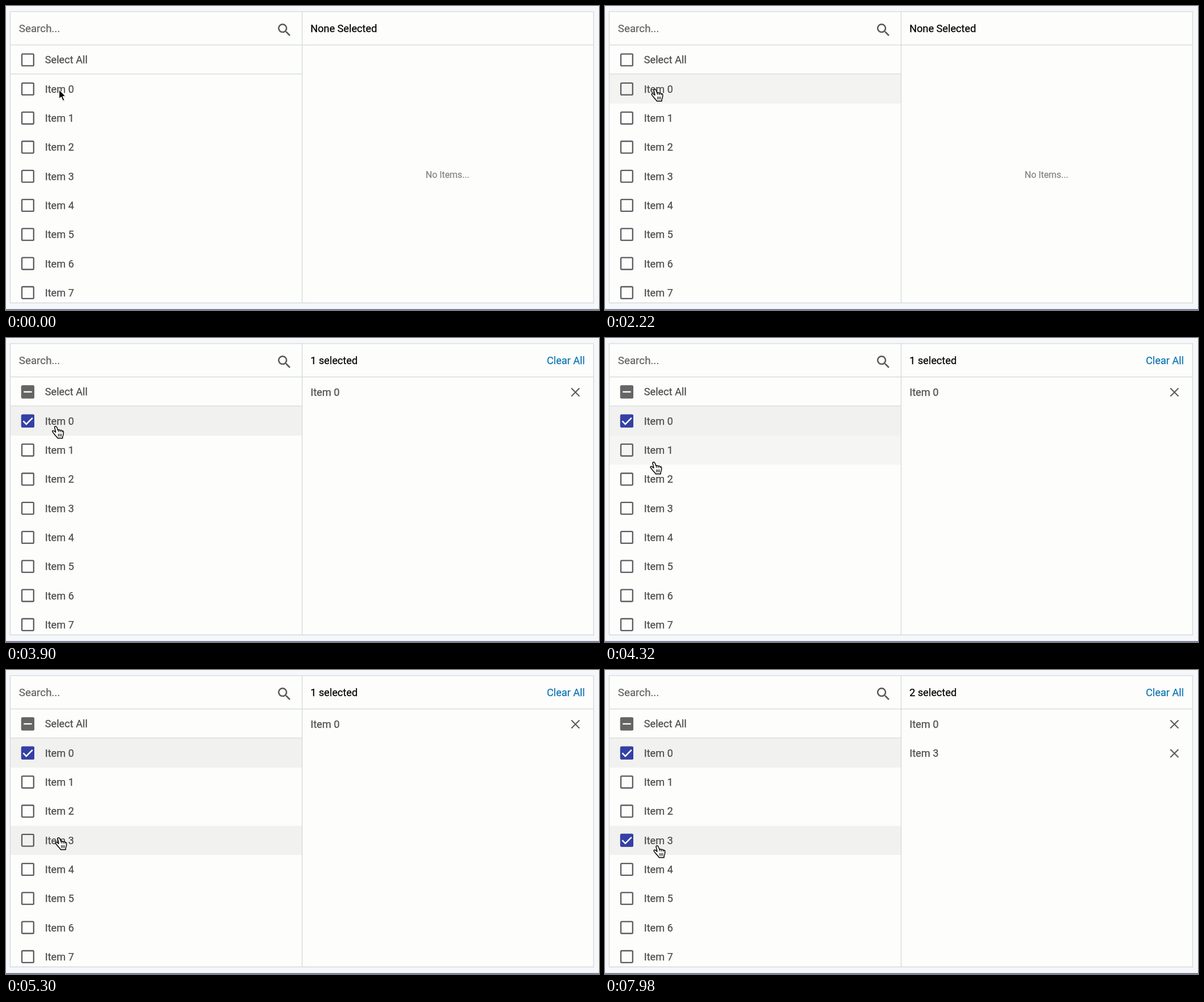
An HTML page that plays this animation: 1046x536 px, repeating every 8000 ms.

```html
<!DOCTYPE html>
<html lang="en">
<head>
<meta charset="utf-8">
<title>Multi-select list</title>
<style>
  html, body { margin: 0; width: 100%; height: 100%; overflow: hidden; background: #f6f7fa; }
  svg { display: block; }
  text { font: 18.2px Roboto, sans-serif; color: #4c4c4c; fill: currentColor; stroke: currentColor; stroke-width: .25; white-space: pre; }
  .search { font-size: 18.8px; color: #626262; }
  .head { color: #000; }
  .link { color: #0b75b3; }
  .empty { font-size: 15.9px; color: #858585; text-anchor: middle; }
  .line { fill: none; stroke: #d3d9da; stroke-width: 1.3; }
  .box { fill: none; stroke: #5c5c62; stroke-width: 2.3; }
  .tick { fill: none; stroke: #fff; stroke-width: 2.5; stroke-dasharray: 24; }
  .cross { stroke: #5c5c5c; stroke-width: 2.1; }
  .hover { fill: #f1f1f0; }
</style>
</head>
<body>
<svg id="stage" width="1046" height="536" viewBox="0 0 1046 536"></svg>
<script>
const LOOP = 8000, PITCH = 51.3, FADE = 380;
const POINT = 1900;                       // arrow becomes a hand
const clicks = [{ row: 0, at: 2600 }, { row: 3, at: 7500 }];
const hovers = [                          // row, enter, leave
  [0, POINT, Infinity], [1, 4080, 4480], [2, 4480, 4920], [3, 4920, Infinity]
];
const path = [                            // time, x, y of the pointer tip
  [1900, 89, 147], [3800, 89, 147], [4080, 88, 172], [4320, 87, 219],
  [4480, 88, 230], [4740, 89, 263], [4920, 92, 277], [5300, 94, 296], [5700, 93, 310]
];

const clamp = v => Math.max(0, Math.min(1, v));
const rowY = i => 146.3 + PITCH * i;
const text = (x, y, s, cls = '') => `<text x="${x}" y="${y}" class="${cls}">${s}</text>`;
const box = y => `<rect class="box" x="28" y="${y - 10.4}" width="20.8" height="20.8" rx="1.5"/>`;
const fill = (y, color) => `<rect x="26.85" y="${y - 11.55}" width="23.1" height="23.1" rx="2"fill="${color}"/>`;

const listRow = i => {
  const y = rowY(i);
  return `<rect class="hover" id="hover${i}" x="8" y="${y - 25.5}" width="514" height="${PITCH}" opacity="0"/>
    ${box(y)}
    <g id="check${i}" opacity="0">${fill(y, '#3440a6')}
      <path class="tick" id="tick${i}" d="M30.4 ${y}l5.4 5.6L46.8 ${y - 5.4}"/></g>
    ${text(68.7, y + 6.4, 'Item ' + i)}`;
};

const chosenRow = (row, i) => {
  const y = rowY(i - 1) + .4;
  return `<g id="chosen${i}">${text(537.2, y + 6.2, 'Item ' + row)}
    <path class="cross" d="M997.3 ${y - 6.8}l14.2 14.2m0-14.2l-14.2 14.2"/></g>`;
};

stage.innerHTML = `
  <rect x="7.5" y="9.7" width="1029" height="514" fill="#fdfdfc"/>
  ${[0, 1, 2, 3, 4, 5, 6, 7].map(listRow).join('')}
  <path class="line" d="M7.5 9.9H1036.5V523.5H7.5ZM522.4 10V523.5M8 68.6H1036M8 119.9H522"/>
  <path d="M0 535.2H1046" stroke="#62678f" stroke-width="1.6"/>
  ${text(22.8, 46.3, 'Search...', 'search')}
  <path transform="translate(475.9 27.2) scale(1.26)" fill="#585858" d="M15.5 14h-.79l-.28-.27A6.47 6.47 0 0 0 16 9.5 6.5 6.5 0 1 0 9.5 16c1.61 0 3.09-.59 4.23-1.57l.27.28v.79l5 4.99L20.49 19l-4.99-5zm-6 0a4.5 4.5 0 1 1 0-9 4.5 4.5 0 0 1 0 9z"/>
  ${box(95)}
  <g id="partial" opacity="0">${fill(95, '#656565')}
    <path d="M31.2 95H45.6" stroke="#fff" stroke-width="2.4"/></g>
  ${text(68.7, 101.4, 'Select All')}
  <text id="count" class="head" x="537" y="46.3"></text>
  <g id="none">${text(778.8, 302.8, 'No Items...', 'empty')}</g>
  <g id="clear">${text(954, 46.3, 'Clear All', 'link')}</g>
  ${clicks.map((c, i) => chosenRow(c.row, i)).join('')}
  <g id="arrow" transform="translate(93 147)" stroke-linejoin="round">
    <path d="M1 1.5V18.5L4.8 15L7.8 22L11.3 20.5L8.3 13.8H13.5Z" fill="#000" opacity=".12"/>
    <path d="M.6 .4V17L4.4 13.4L7.3 20.2L10.2 19L7.3 12.4H12.3Z" fill="#000" stroke="#fff" stroke-width="1.2"/>
  </g>
  <g id="hand" stroke="#111" stroke-width="1.6" stroke-linejoin="round" stroke-linecap="round">
    <path fill="#fff" d="M-2.8 2C-3.4 -.2 -.4 -1.3 .8 1L3.2 6.6C4 5.4 6 5.7 6.6 7C7.8 6 9.5 6.4 10 7.8C11.5 7.2 12.8 8.2 12.8 10C13 14 12 16 11.2 18V20.6H2.4C1.2 18 -1.8 16 -3.8 13C-5.2 11 -7.4 9.8 -6.8 8C-5.8 6.6 -3.6 7.6 -1 10.2Z"/>
    <path fill="none" stroke-width="1.2" d="M3.2 6.6L4.2 9.4M6.6 7L7.2 9.6M10 7.8L10.2 9.8M3.8 13V17.2M6.3 13V17.2M8.8 13V17.2"/>
  </g>`;

const el = id => document.getElementById(id);
const show = (id, v) => el(id).setAttribute('opacity', +v);

function tip(t) {
  const n = path.findIndex(p => p[0] > t);
  if (n < 0) return path[path.length - 1].slice(1);
  if (n === 0) return path[0].slice(1);
  const a = path[n - 1], b = path[n], k = (t - a[0]) / (b[0] - a[0]);
  return [1, 2].map(j => a[j] + (b[j] - a[j]) * k);
}

function draw(t) {
  for (const [row, enter, leave] of hovers) {
    const level = clamp((Math.min(t, leave) - enter) / FADE) - Math.max(0, t - leave) / FADE;
    show('hover' + row, clamp(level));
  }
  clicks.forEach(({ row, at }, i) => {
    show('check' + row, clamp((t - at) / 90));
    el('tick' + row).style.strokeDashoffset = 24 * (1 - clamp((t - at) / 180));
    show('chosen' + i, t >= at);
  });
  const n = clicks.filter(c => t >= c.at).length;
  show('partial', clamp((t - clicks[0].at) / 90));
  show('none', !n);
  show('clear', n > 0);
  el('count').textContent = n ? n + ' selected' : 'None Selected';
  show('arrow', t < POINT);
  show('hand', t >= POINT);
  el('hand').setAttribute('transform', `translate(${tip(t)})`);
}

const start = performance.now();
function tick() {
  draw((performance.now() - start) % LOOP);
  requestAnimationFrame(tick);
}
tick();
</script>
</body>
</html>
```
